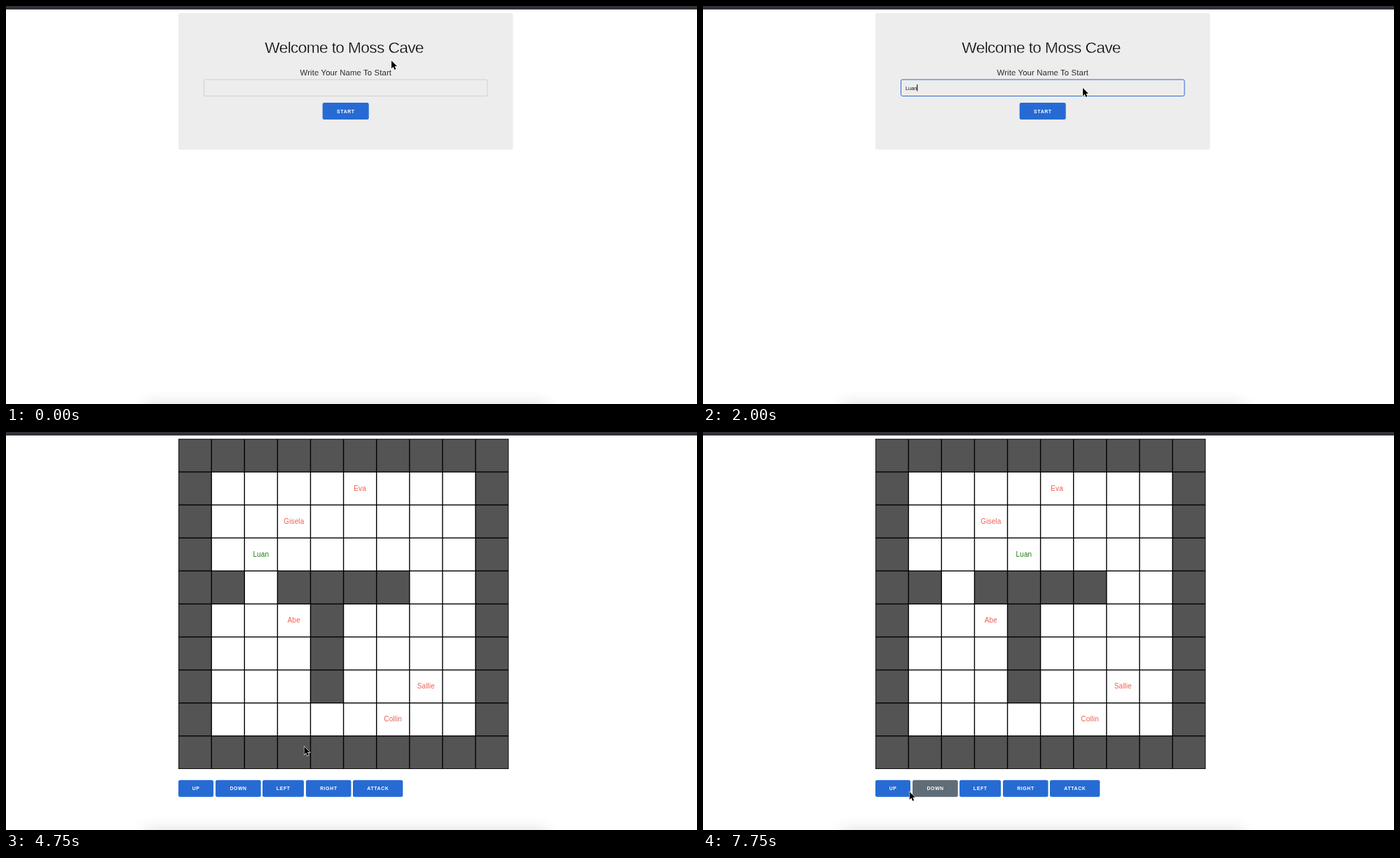
An HTML page for the animation above (8 s loop, 986x568 px).

```html
<!DOCTYPE html>
<html lang="en">
<head>
<meta charset="utf-8">
<title>Moss Cave</title>
<style>
  html, body { margin: 0; width: 100%; height: 100%; overflow: hidden; background: #fff; }
  svg { display: block; width: 986px; height: 568px; font-family: "Liberation Sans", Arial, sans-serif; }
  .mid { text-anchor: middle; }
  .title { font-size: 22.7px; letter-spacing: -.63px; stroke: #ededed; stroke-width: .45px; }
  .label { font-size: 11.4px; letter-spacing: .1px; stroke: #ededed; stroke-width: .18px; }
  .btn rect { fill: #266bd4; }
  .btn.on rect { fill: #606c76; }
  .btn text { font-size: 6.9px; font-weight: 700; letter-spacing: .63px; fill: #fff; }
  .name { font-size: 10px; letter-spacing: .1px; fill: #ef5f52; }
  .me { fill: #1e7a12; }
  .typed { font-size: 7.4px; fill: #111; }
  .option { font: 9.8px Inter, sans-serif; fill: #ececec; }
</style>
</head>
<body>
<svg id="stage" viewBox="0 0 986 568">
  <defs>
    <filter id="blur" x="-20%" y="-100%" width="140%" height="300%"><feGaussianBlur stdDeviation="12"/></filter>
    <filter id="soft" x="-10%" y="-20%" width="120%" height="150%">
      <feDropShadow dx="0" dy="1" stdDeviation="1.3" flood-opacity=".4"/>
    </filter>
  </defs>
  <rect x="198" y="570" width="574" height="70" opacity=".16" filter="url(#blur)"/>
  <rect width="986" height="5" fill="#343138"/>
  <g id="login">
    <rect x="246" y="10" width="477.5" height="195" rx="3" fill="#ededed"/>
    <text class="title" x="369.3" y="67">Welcome to Moss Cave</text>
    <text class="label mid" x="484.8" y="99">Write Your Name To Start</text>
    <rect id="field" x="282.5" y="105" width="404.5" height="23.5" rx="2.2" fill="none"/>
    <text id="typed" class="typed" x="289" y="119.6"></text>
    <rect id="caret" y="112" width="1" height="9.5"/>
  </g>
  <g id="game"></g>
  <g id="menu">
    <rect id="menuBox" x="282" y="130" width="151" rx="3" fill="#28292d" filter="url(#soft)"/>
  </g>
  <path id="cursor" d="M0 0V11.2L2.6 8.8L4.4 13L6.4 12.1L4.6 8.1H8Z" stroke="#fff" stroke-width="1.1" paint-order="stroke"/>
</svg>
<script>
const NS = 'http://www.w3.org/2000/svg';
const LOOP = 8000, CELL = 47.1, LEFT = 246, TOP = 10;
const PLAYER = 'Luan';
const $ = id => document.getElementById(id);

function add(parent, tag, attrs, text = '') {
  const el = document.createElementNS(NS, tag);
  for (const key in attrs) el.setAttribute(key, attrs[key]);
  el.textContent = text;
  parent.append(el);
  return el;
}

function button(parent, label, x, y, width) {
  const g = add(parent, 'g', { class: 'btn' });
  add(g, 'rect', { x, y, width, height: 24, rx: 2.5 });
  add(g, 'text', { class: 'mid', x: x + width / 2 + .2, y: y + 14.7 }, label);
  return g;
}

function nameAt(name, col, row, cls = '') {
  return add($('game'), 'text', {
    class: 'name mid ' + cls,
    x: LEFT + CELL * (col + .5),
    y: TOP + CELL * (row + .5) + 3
  }, name);
}

const isWall = (c, r) =>
  c % 9 === 0 || r % 9 === 0 ||
  (r === 4 && c !== 2 && c < 7) ||
  (c === 4 && r > 4 && r < 8);

const buttons = { start: button($('login'), 'START', 451.7, 138, 66) };

add($('game'), 'rect', { x: LEFT, y: TOP - .3, width: 471.3, height: 471.3 });
for (let r = 0; r < 10; r++) {
  for (let c = 0; c < 10; c++) {
    add($('game'), 'rect', {
      x: LEFT + CELL * c + .8, y: TOP + CELL * r + .6,
      width: CELL - 1.4, height: CELL - 1.4,
      fill: isWall(c, r) ? '#545454' : '#fff'
    });
  }
}
[['Eva', 5, 1], ['Gisela', 3, 2], ['Abe', 3, 5], ['Sallie', 7, 7], ['Collin', 6, 8]]
  .forEach(p => nameAt(...p));
const me = nameAt(PLAYER, 2, 3, 'me');
[['up', 246, 50], ['down', 299, 64.7], ['left', 366, 59], ['right', 428, 64.5], ['attack', 495, 71.3]]
  .forEach(([id, x, w]) => buttons[id] = button($('game'), id.toUpperCase(), x, 496.7, w));

const options = [PLAYER, 'asd', 'test'].map((s, i) =>
  add($('menu'), 'text', { class: 'option', x: 291.7, y: 154 + 28.3 * i }, s));

// Each track lists [start time, value...]; the value holds until the next start.
const tracks = {
  cursor: [[0, 550, 78], [250, 541, 112], [500, 540.5, 121], [1000, 542, 117], [2250, 489, 163],
    [2500, 487, 167], [2750, 485.5, 157], [3000, 488, 151], [3750, 472, 276], [4000, 460.5, 307],
    [4250, 460.5, 310], [4500, 428.5, 427], [4750, 425.5, 449], [5000, 426, 488],
    [5250, 442.5, 506], [7500, 349, 518], [7750, 294.7, 513.5]],
  hover: [[0, ''], [2250, 'start'], [2500, ''], [2750, 'start'], [3250, ''], [5250, 'right'],
    [6000, ''], [6500, 'right'], [6750, ''], [7500, 'down']],
  letters: [[0, 0], [1500, 1], [1750, 3], [2000, 4]],
  menu: [[0, 0], [1000, 3], [1500, 1], [2000, 0]],
  focus: [[0, false], [1000, true], [2500, false]],
  column: [[0, 2], [6000, 3], [6750, 4]]
};

const at = (track, t) => tracks[track].findLast(step => step[0] <= t).slice(1);
const show = (el, on) => el.style.display = on ? '' : 'none';

function draw(t) {
  const [x, y] = at('cursor', t);
  const [hover] = at('hover', t), [letters] = at('letters', t);
  const [rows] = at('menu', t), [focus] = at('focus', t), [column] = at('column', t);

  show($('login'), t < 3250);
  show($('game'), t >= 3250);
  $('cursor').setAttribute('transform', `translate(${x} ${y})`);
  for (const id in buttons) buttons[id].classList.toggle('on', id === hover);

  $('field').setAttribute('stroke', focus ? '#266bd4' : '#d0d0d0');
  $('typed').textContent = PLAYER.slice(0, letters);
  show($('caret'), focus);
  $('caret').setAttribute('x', 289 + letters * 4.05);

  show($('menu'), rows > 0);
  $('menuBox').setAttribute('height', 12.1 + 28.3 * rows);
  options.forEach((el, i) => show(el, i < rows));
  me.setAttribute('x', LEFT + CELL * (column + .5));
}

const begin = performance.now();
function tick() {
  draw((performance.now() - begin) % LOOP);
  requestAnimationFrame(tick);
}
draw(0);
requestAnimationFrame(tick);
</script>
</body>
</html>
```
